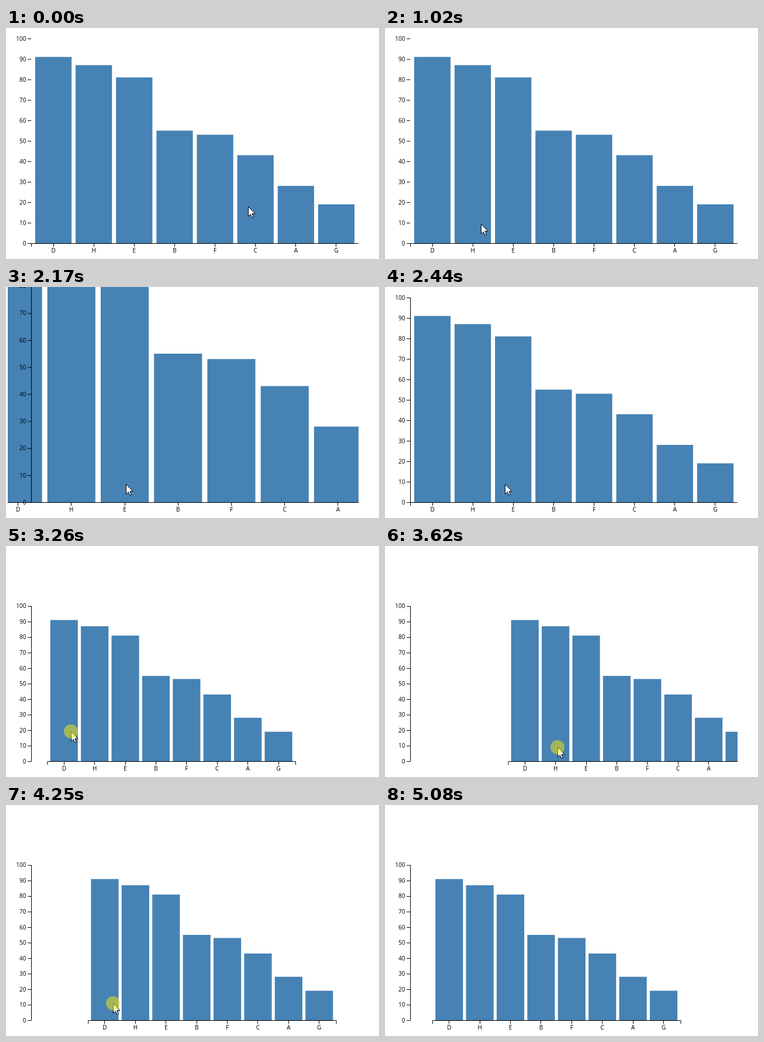
Recreate the animation shown at these times as an HTML page. Size 638x395 px, loop 6690 ms.

```html
<!DOCTYPE html>
<html lang="en">
<head>
<meta charset="utf-8">
<title>Zoomable bar chart</title>
<style>
  html, body { margin: 0; width: 100%; height: 100%; overflow: hidden; background: #fff; }
  svg { display: block; }
  text { font: 10px "Open Sans", "Noto Sans", sans-serif; fill: #000; }
  .axis path { fill: none; stroke: #000; }
</style>
</head>
<body>
<svg width="638" height="395" viewBox="0 0 638 395">
  <clipPath id="view"><rect x="3" y="0" width="600" height="395"/></clipPath>
  <g clip-path="url(#view)">
    <g id="bars" fill="steelblue"></g>
    <g id="xAxis" class="axis"><path/></g>
    <g id="yAxis" class="axis"><path/><path/></g>
  </g>
  <g id="pointer">
    <path d="M.5 .5V17L4.3 13.4L6.8 19.2L9.4 18.1L6.9 12.4H12Z" fill="#fff" stroke="#000"/>
    <circle id="press" r="12" fill="#ffeb00" fill-opacity=".5"/>
  </g>
</svg>
<script>
const LOOP = 6690, LEFT = 3, MARGIN = 40, BASE = 368, WIDTH = 560, HEIGHT = 350;
const DATA = [["D", 91], ["H", 87], ["E", 81], ["B", 55], ["F", 53], ["C", 43], ["A", 28], ["G", 19]];
const STEP = WIDTH / (DATA.length + 0.1), BAND = STEP * 0.9;
const ZOOM_X = 202.5;

// [time, wheel clicks]
const WHEEL = [[0, 0], [1430, 1], [1640, 2], [1840, 3], [2170, 2], [2240, 1],
  [2440, 0], [2500, -1], [2700, -2]];

// [time, pointer x, pointer y, chart drag]
const MOVES = [
  [40, 414, 305, 0], [110, 421, 304, 0], [390, 421, 304, 0],
  [600, 350, 312, 0], [1020, 164, 335, 0], [1300, 205, 337, 0],
  [2700, 205, 337, 0], [3190, 111, 317, 0], [3260, 111, 317, 0],
  [3330, 116, 318, 4], [3470, 190, 330, 58], [3610, 295, 344, 140],
  [3820, 343, 346, 177], [4030, 275, 343, 128], [4240, 183, 339, 69.7],
  [4730, 139, 346, 10.5], [4800, 150, 348, 10.5], [5010, 508, 385, 10.5]
];

const $ = id => document.getElementById(id);

function add(parent, tag, attrs, label) {
  const el = document.createElementNS("http://www.w3.org/2000/svg", tag);
  set(el, attrs);
  if (label !== undefined) el.textContent = label;
  parent.appendChild(el);
  return el;
}

function set(el, attrs) {
  for (const name in attrs) el.setAttribute(name, attrs[name]);
}

const bars = DATA.map(() => add($("bars"), "rect", {}));
const xLabels = DATA.map(([name]) => add($("xAxis"), "text", { y: BASE + 16.1, "text-anchor": "middle" }, name));
const yLabels = Array.from({ length: 11 }, (_, i) => add($("yAxis"), "text", { x: 34.5, "text-anchor": "end" }, i * 10));
const xPath = $("xAxis").querySelector("path");
const [yTicks, yLine] = $("yAxis").querySelectorAll("path");

function moveAt(t) {
  const i = MOVES.findIndex(m => m[0] > t);
  if (i === 0) return MOVES[0];
  if (i < 0) return MOVES[MOVES.length - 1];
  const a = MOVES[i - 1], b = MOVES[i];
  const p = (t - a[0]) / (b[0] - a[0]);
  return a.map((v, j) => v + (b[j] - v) * p);
}

function drawChart(k, drag) {
  const x0 = LEFT + k * (MARGIN + ZOOM_X * (1 - k)) + drag;
  const yAt = v => BASE - v / 100 * HEIGHT * k;
  const mid = BASE + 0.5;

  let d = `M${x0 + 0.5} ${BASE + 6}V${mid}H${x0 + WIDTH * k + 0.5}V${BASE + 6}`;
  DATA.forEach(([, value], i) => {
    const x = x0 + k * STEP * (i + 0.1), y = yAt(value);
    const center = x + k * BAND / 2;
    set(bars[i], { x, y, width: k * BAND, height: BASE - y });
    set(xLabels[i], { x: center });
    const tick = Math.floor(center) + 0.5;
    d += `M${tick} ${mid}V${BASE + 6}`;
  });
  set(xPath, { d });

  let ticks = "";
  yLabels.forEach((label, i) => {
    const y = yAt(i * 10) + 0.5;
    set(label, { y: y + 3.2 });
    ticks += `M37 ${y}H43`;
  });
  set(yTicks, { d: ticks });
  set(yLine, { d: `M43.5 ${mid}V${yAt(100)}` });
}

function render(t) {
  const clicks = WHEEL.filter(w => w[0] <= t).pop()[1];
  // pointer and drag update every 70 ms
  const [, x, y, drag] = moveAt(Math.floor((t - 40) / 70) * 70 + 40);
  drawChart(2 ** (clicks * 0.2), drag);
  set(yLine, { visibility: t < WHEEL[1][0] ? "hidden" : "visible" });
  set($("pointer"), {
    transform: `translate(${x} ${y})`,
    visibility: t < 5080 ? "visible" : "hidden"
  });
  set($("press"), { opacity: t >= 3260 && t < 4800 ? 1 : 0 });
}

const start = performance.now();
function loop() {
  render((performance.now() - start) % LOOP);
  requestAnimationFrame(loop);
}
loop();
</script>
</body>
</html>
```
